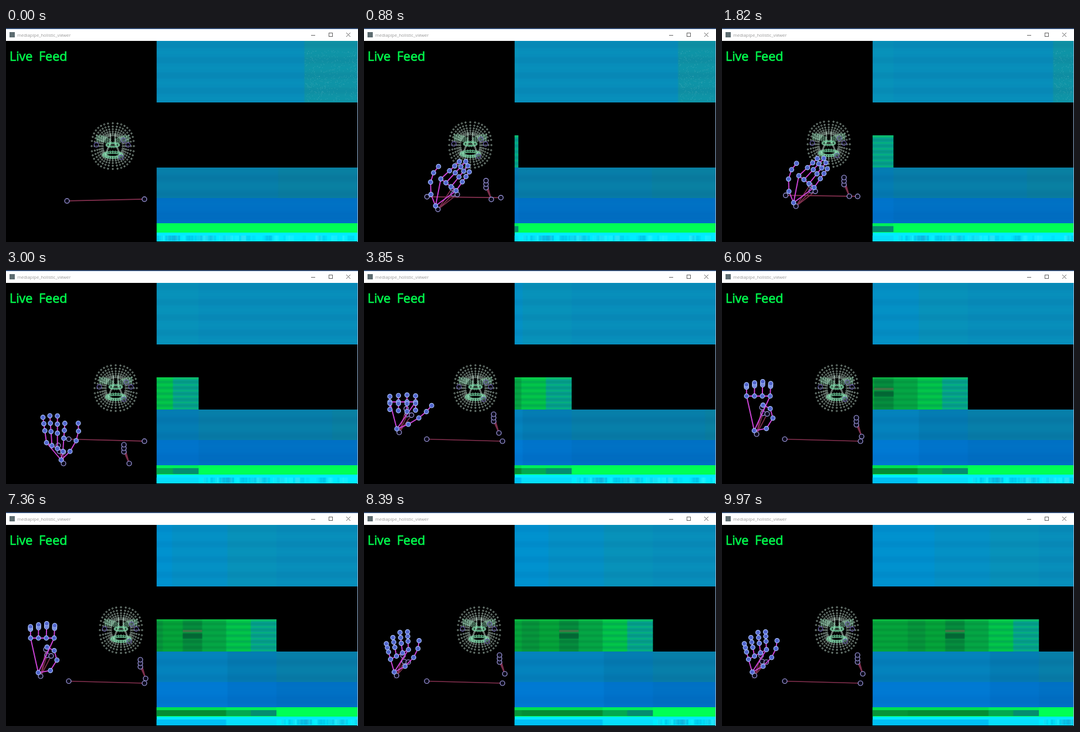
Recreate the animation shown at these times as an HTML page with a canvas. Size 600x365 px, loop 10 s.

```html
<!DOCTYPE html>
<html lang="en">
<head>
<meta charset="utf-8">
<title>mediapipe_holistic_viewer</title>
<style>
  html, body { margin: 0; width: 600px; height: 365px; overflow: hidden; background: #000; }
  canvas { position: absolute; left: 0; top: 0; }
  p { position: absolute; margin: 0; white-space: pre; font-family: "Open Sans", sans-serif; }
  #title { left: 19px; top: 6px; font-size: 7.5px; line-height: 12px; color: #999; }
  #feed { left: 6px; top: 33px; font-size: 21.5px; line-height: 30px; word-spacing: 5px; color: #00f84c; -webkit-text-stroke: .7px #00f84c; }
</style>
</head>
<body>
<canvas id="view" width="600" height="365"></canvas>
<p id="title">mediapipe_holistic_viewer</p>
<p id="feed">Live Feed</p>
<script>
const LOOP = 10000, STEP = LOOP / 262;
const LEFT = 256.5, RIGHT = 599, SPEED = 0.0305;
const SEEN = 660, OLDEST = -11300, BLEND = 170;
const g = document.getElementById('view').getContext('2d');

const lerp = (a, b, k) => a + (b - a) * k;
const mix = (a, b, k) => a.map((v, i) => lerp(v, b[i], k));
const ease = k => (k = Math.min(1, Math.max(0, k)), k * k * (3 - 2 * k));
const add = ([x, y], dx, dy) => [x + dx, y + dy];
// Step from a point; 0 degrees is straight up, positive is clockwise
const walk = ([x, y], deg, len) => {
  const a = deg * Math.PI / 180;
  return [x + Math.sin(a) * len, y - Math.cos(a) * len];
};

let seed = 7;
const rnd = () => (seed = (seed * 16807) % 2147483647) / 2147483647;

// Each sign: wrist, offset to the knuckles, step from index to pinky knuckle, finger
// direction, length and curl, thumb direction and bend, the resting wrist, recorded colours
const closed = {
  at: 4814, wrist: [55, 274], palm: [7, -59], row: [-13.4, 0], aim: 1, length: 42, curl: 0.25,
  thumb: [80, -48], rest: [238, 284], heat: '#05863c', cuff: '#068c34'
};
const signs = [
  { at: SEEN, wrist: [122, 298], palm: [22, -36], row: [8.7, 6.7], aim: 41, length: 51, curl: 1,
    thumb: [-22, 20], rest: [217, 287], heat: '#069c90', cuff: '#068c70' },
  { at: 2098, wrist: [94, 324], palm: [-11, -22], row: [-9.3, -5], aim: -2, length: 57, curl: 1,
    thumb: [46, -16], rest: [210, 330], heat: '#02bc48', cuff: '#04a850' },
  { at: 3472, wrist: [56, 271], palm: [10, -46], row: [-14.6, 0], aim: 0, length: 26, curl: -2.1,
    thumb: [68, -9], rest: [230, 278], heat: '#04a244', cuff: '#068c34' },
  closed,
  { ...closed, at: 5895, heat: '#04a038' },
  { ...closed, at: 7010, heat: '#06903a' },
  { at: 7990, wrist: [51.5, 273], palm: [9, -30], row: [-10.2, 5.5], aim: -9, length: 36, curl: 1,
    thumb: [62, -18], rest: [240, 276], heat: '#04a03a', cuff: '#089438' }
];

// All arm points of a sign: 21 hand joints, 4 of the resting arm, 4 of the raised arm
function armPoints({ wrist, palm, row, aim, length, curl, thumb, rest }) {
  const out = [wrist];
  [1, 1, 0.8, 0.65].forEach((s, i) => out.push(walk(out[i], thumb[0] + thumb[1] * i, 21 * s)));
  for (let i = 0; i < 4; i++) {
    const side = 1.5 - i, deg = aim + side * 4 * Math.max(0, curl);
    const size = length * (1 - Math.abs(i - 1.2) * 0.13);
    const knuckle = add(wrist, palm[0] - side * row[0], palm[1] - side * row[1]);
    out.push(knuckle);
    for (const bend of [0, 0.28, 0.53]) out.push(walk(knuckle, deg, size * (0.47 + bend * curl)));
  }
  const center = add(wrist, palm[0] + 6, palm[1] * 0.4 - 16);
  return [...out,
    rest, add(rest, -9, -20), add(rest, -9, -26), add(rest, -9, -32),
    add(wrist, 4, 6), center, add(center, 2, 10), add(center, 9, 11)];
}
const poses = signs.map(armPoints);

function armsAt(t) {
  let i = signs.length - 1;
  while (i && t < signs[i].at - BLEND) i--;
  if (i) {
    const k = ease((t - signs[i].at + BLEND) / (2 * BLEND));
    return poses[i].map((p, n) => mix(poses[i - 1][n], p, k));
  }
  const drop = 130 * (1 - ease(t / 1000));
  return poses[0].map(p => add(p, 0, drop));
}

const fingers = [0, 1, 2, 3, 4].map(f => [1, 2, 3, 4].map(j => f * 4 + j));
const handPaths = [...fingers, [0, 1], [0, 5], [0, 17], [5, 9, 13, 17]];

function line(pts, color, width) {
  g.strokeStyle = color;
  g.lineWidth = width;
  g.beginPath();
  pts.forEach(p => g.lineTo(p[0], p[1]));
  g.stroke();
}
function joint([x, y], fill, edge, r = 4) {
  g.beginPath();
  g.arc(x, y, r, 0, 7);
  g.fillStyle = fill;
  g.fill();
  g.strokeStyle = edge;
  g.lineWidth = 1.2;
  g.stroke();
}
const poseJoint = p => joint(p, '#0b0a1c', '#a5a0e6');
const dimJoint = p => joint(p, 'rgba(8,6,24,.3)', '#6c62b0', 3.8);

// Face dots relative to the face centre
const mesh = [], features = [];
function ring(list, cx, cy, rx, ry, n, power = 1) {
  for (let i = 0; i < n; i++) {
    const a = i / n * Math.PI * 2, c = Math.cos(a), s = Math.sin(a);
    list.push([cx + rx * Math.sign(c) * Math.abs(c) ** power, cy + ry * Math.sign(s) * Math.abs(s) ** power]);
  }
}
for (let f = 1; f > 0.45; f *= 0.86) ring(mesh, 0, 0, 36 * f, 39 * f, 36, 0.85);
for (const side of [-1, 1]) {
  // Brow and eye rows slope down towards the nose
  for (let row = 0; row < 4; row++) {
    for (let i = 0; i < 7; i++) features.push([side * (5 + i * 3.6), -17 + row * 2.8 + (6 - i) * 0.9 - Math.sin(i / 2) * 2]);
  }
  for (let i = 0; i < 6; i++) mesh.push([side * 4, -20 + i * 3], [side * (7 + i), 1 + i * 2.5]);
}
ring(features, 0, -2, 11, 4, 18);
ring(features, 0, -2, 6, 2.2, 12);
ring(features, 0, 15, 17, 6, 24);
ring(features, 0, 15, 13, 3.2, 20);

function dots(list, cx, cy, color) {
  g.strokeStyle = color;
  g.lineWidth = 0.75;
  g.beginPath();
  for (const [x, y] of list) {
    g.moveTo(cx + x + 1.15, cy + y);
    g.arc(cx + x, cy + y, 1.15, 0, 7);
  }
  g.stroke();
}

function drawFace([cx, cy]) {
  dots(mesh, cx, cy, '#c2dccf');
  dots(features, cx, cy, '#98e6bc');
  g.strokeStyle = '#5fd498';
  g.lineWidth = 1;
  for (const [y, rx, ry] of [[15, 16, 5.5], [15, 12, 2.6], [-2, 10, 3.4]]) {
    g.beginPath();
    g.ellipse(cx, cy + y, rx, ry, 0, 0, 7);
    g.stroke();
  }
  [[-28, -2], [26, -2], [18, -10], [14, 19]].forEach(([x, y]) => dimJoint([cx + x, cy + y]));
}

function drawPeople(t) {
  const lean = Math.exp(-(((t - 1500) / 700) ** 2));
  const face = [182 + 14 * ease(t / 6000 - 0.1) - 2 * lean, 201.5 - 4 * lean];
  const shoulders = [
    [107 + 2 * lean - 3 * Math.exp(-t / 500), 288.5 - 4 * lean + 6.5 * Math.exp(-t / 500)],
    [236 - 6 * lean, 292 - 6 * lean]
  ];
  const arms = armsAt(t), hand = arms.slice(0, 21);
  g.save();
  g.beginPath();
  g.rect(0, 22, LEFT, 342);
  g.clip();
  drawFace(face);
  line(shoulders, '#84304f', 1.7);
  for (const set of [arms.slice(21, 25), arms.slice(25)]) {
    const [w, pinky, index, thumb] = set;
    line([w, pinky, index, w, thumb], '#7c2f4c', 1.7);
    set.forEach(poseJoint);
  }
  shoulders.forEach(poseJoint);
  if (t >= SEEN) {
    handPaths.forEach(path => line(path.map(n => hand[n]), '#cb43d6', 1.9));
    hand.forEach(p => joint(p, '#5064cc', '#a8bff8', 3.8));
  }
  g.restore();
}

// Heat strips: colours keyed by the moment they were recorded
const strips = [
  [22, 105, [[OLDEST, '#0f92a5'], [-8265, '#078cba'], [SEEN, '#0790b9'], [3400, '#048fc5'], [6500, '#0090cf']]],
  [238, 52, [[OLDEST, '#097da0'], [-6800, '#077ca8'], [SEEN, '#047ab2'], [3400, '#0480bc']]],
  [290, 43, [[OLDEST, '#006fc4'], [SEEN, '#0072cb'], [3400, '#0078d3']]],
  [333, 16, [[OLDEST, '#00ff55']]],
  [349, 15, [[OLDEST, '#00ecff']]]
];
const handTones = signs.map(s => [s.at, s.heat]);
const cuffTones = signs.map(s => [s.at, s.cuff]);
const topTones = [[SEEN, '#00ee5a'], [3472, '#00e050']];
const baseTones = [[SEEN, '#06defb'], [3472, '#00c0f4']];

const blots = Array.from({ length: 80 }, () => ({
  at: lerp(OLDEST, SEEN - 200, rnd()), w: 3 + rnd() * 11, a: 0.05 + rnd() * 0.14, pale: rnd() < 0.5
}));
const specks = Array.from({ length: 420 }, () => ({ at: lerp(OLDEST, -8265, rnd()), y: 38 + rnd() * 86 }));

function strip(t, y, h, tones) {
  const xAt = m => LEFT + SPEED * (t - m), end = Math.min(RIGHT, xAt(tones[0][0]));
  if (end <= LEFT) return;
  const grad = g.createLinearGradient(xAt(LOOP), 0, xAt(OLDEST), 0);
  const pos = m => (LOOP - m) / (LOOP - OLDEST);
  for (let i = tones.length - 1; i >= 0; i--) {
    const [from, color] = tones[i], to = i + 1 < tones.length ? tones[i + 1][0] - 45 : LOOP;
    grad.addColorStop(pos(to), color);
    grad.addColorStop(pos(from + (i ? 45 : 0)), color);
  }
  g.fillStyle = grad;
  g.fillRect(LEFT, y, end - LEFT, h);
}

// Soft horizontal waves of a dark and a light tint
function shade(x, w, y, h, period, alpha, phase, dark = '0,30,70', light = '0,190,190') {
  for (let i = 0; i < h; i++) {
    const s = Math.sin((i / period + phase) * Math.PI * 2);
    g.fillStyle = `rgba(${s > 0 ? dark : light},${alpha * Math.abs(s)})`;
    g.fillRect(x, y + i, w, 1);
  }
}

function drawHeat(t) {
  const xAt = m => LEFT + SPEED * (t - m), width = RIGHT - LEFT;
  g.save();
  g.beginPath();
  g.rect(LEFT, 22, width, 342);
  g.clip();
  strips.forEach(([y, h, tones]) => strip(t, y, h, tones));
  shade(LEFT, width, 22, 105, 26, 0.04, 0);
  shade(LEFT, width, 238, 52, 27, 0.04, 0.6);
  shade(LEFT, width, 290, 43, 40, 0.03, 0.5);

  g.fillStyle = 'rgba(110,190,200,.38)';
  specks.forEach(s => g.fillRect(xAt(s.at), s.y, 1, 1));
  for (const { at, w, a, pale } of blots) {
    g.fillStyle = pale ? `rgba(120,255,255,${a})` : `rgba(0,130,190,${a})`;
    g.fillRect(xAt(at), 354, w, 9);
  }

  strip(t, 183, 55, handTones);
  strip(t, 333, 5, topTones);
  strip(t, 338, 10, cuffTones);
  strip(t, 354, 10, baseTones);

  const during = (from, to, paint) => {
    const x = Math.max(LEFT, xAt(to)), w = xAt(from) - x;
    if (w > 0) paint(x, w);
  };
  during(SEEN, 3472, (x, w) => shade(x, w, 183, 55, 10, 0.28, 0.5, '0,140,100', '0,225,80'));
  during(3472, LOOP, (x, w) => shade(x, w, 183, 55, 10, 0.12, 0.5, '0,80,50', '0,200,70'));
  during(SEEN, LOOP, (x, w) => {
    g.fillStyle = 'rgba(20,215,70,.4)';
    g.fillRect(x, 183, w, 3);
  });
  during(4814, 5895, (x, w) => {
    g.fillStyle = 'rgba(125,105,80,.5)';
    g.fillRect(x, 201, w, 4);
    g.fillStyle = 'rgba(0,70,45,.45)';
    g.fillRect(x, 207, w, 9);
  });
  g.restore();
}

function drawWindow() {
  g.fillStyle = '#fff';
  g.fillRect(0, 0, 600, 22);
  g.fillStyle = '#8fb0d0';
  g.fillRect(599, 22, 1, 343);
  g.fillStyle = '#14233c';
  g.fillRect(0, 0, 600, 1);
  g.fillStyle = '#6384b4';
  g.fillRect(0, 1, 600, 1);
  g.fillStyle = '#5d6c70';
  g.fillRect(6, 7, 9, 9);
  g.strokeStyle = '#666';
  g.lineWidth = 1;
  g.strokeRect(550.5, 8.5, 6, 6);
  line([[520, 12.5], [527, 12.5]], '#666', 1);
  line([[580, 8], [587, 15]], '#666', 1);
  line([[587, 8], [580, 15]], '#666', 1);
}

function draw(now) {
  const t = Math.round((now % LOOP) / STEP) * STEP;
  g.fillStyle = '#000';
  g.fillRect(0, 0, 600, 365);
  drawHeat(t);
  drawPeople(t);
  drawWindow();
}

const begin = performance.now();
function tick() {
  draw(performance.now() - begin);
  requestAnimationFrame(tick);
}
tick();
</script>
</body>
</html>
```
